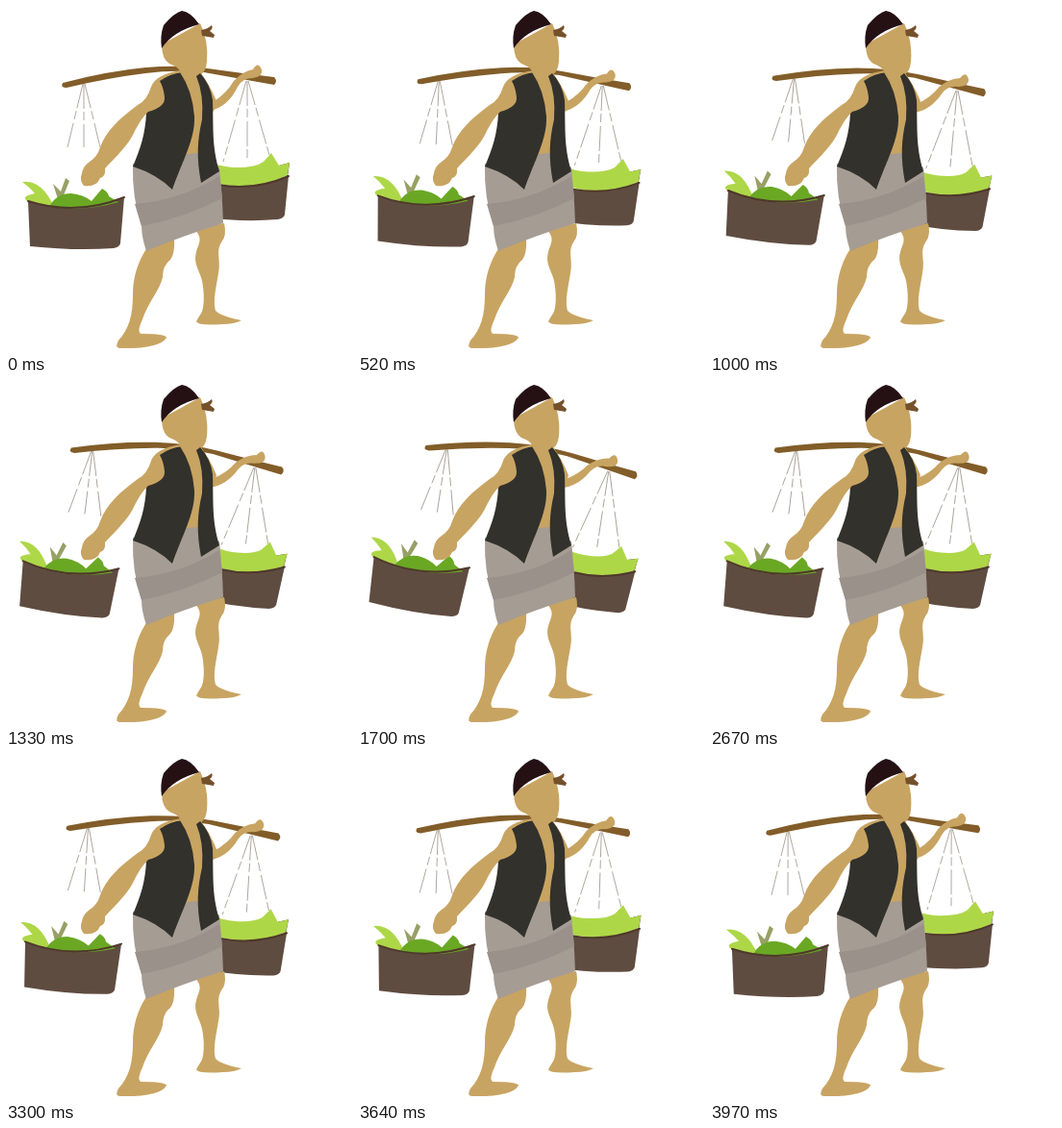
Write an HTML page that moves like this. It is 360 px wide and 360 px high and loops after 4 s.

```html
<!DOCTYPE html>
<html lang="en">
<head>
<meta charset="utf-8">
<title>Vegetable carrier</title>
<style>
  html, body { margin: 0; width: 100%; height: 100%; overflow: hidden; background: #fff; }
  svg { display: block; width: 100vw; height: 100vh; }
  .skin { fill: #c8a462; }
  .vest { fill: #32312c; }
  .wood { fill: #825d29; }
  .basket { fill: #5f4c40; }
  .rim { fill: none; stroke: #4f382b; stroke-width: 2; stroke-linecap: round; }
  .light { fill: #aed748; }
  .green { fill: #6aa824; }
  .string { fill: none; stroke: #8d8474; stroke-width: .7; stroke-dasharray: 26 3 9 4; }
</style>
</head>
<body>
<svg viewBox="0 0 360 360">
  <g id="load">
    <g id="strings" class="string"></g>
    <!-- left basket -->
    <path class="light" d="M17 183Q37 180 50 209L22 203Q15 198 30 195Q25 189 17 183Z"/>
    <path d="M54 201L49 185L57 193L62 179L66 182L57 204Z" fill="#98a065"/>
    <path id="leftBasket" class="basket"/>
    <path class="green" d="M45 209Q52 195 68 195Q80 196 89 203L100 190Q106 193 107 198L117 204Q84 214 45 209Z"/>
    <path id="leftRim" class="rim"/>
    <!-- right basket -->
    <path d="M284 166L295 163L293 178Z" fill="#4b3328"/>
    <path id="rightBasket" class="basket"/>
    <path class="light" d="M212 163Q228 168 240 168Q260 168 268 162L276 153L284 166L295 163L293 176Q255 196 212 182Z"/>
    <path id="rightRim" class="rim"/>
    <!-- pole -->
    <path class="wood" d="M59 80Q104 68 145 64Q180 61 210 65Q245 70 279 74Q283 78 279 82Q245 76 206 69Q175 66 145 70Q105 75 63 85Q56 85 59 80Z"/>
  </g>

  <!-- right arm -->
  <path class="skin" d="M203 70Q212 82 219 99L216 110L203 100Z"/>
  <path id="forearm" class="skin" d="M202 92L218 98Q230 90 237 78Q246 68 257 66Q262 57 266 66Q268 73 257 75Q246 75 241 84Q232 103 216 108L202 102Z"/>

  <!-- legs -->
  <path class="skin" d="M148 250C136 266 132 285 132 300C132 322 128 336 117 348Q113 355 118 356Q160 357 167 345Q166 341 140 341Q136 338 142 326C148 308 160 296 163 282Q163 270 171 264Q176 258 175 241Z"/>
  <path class="skin" d="M196 232C206 243 200 247 198 256C194 270 204 277 205 292Q207 308 204 318L198 328Q199 333 226 331Q238 331 245 327Q224 323 218 317C215 306 219 291 221 278C224 264 218 256 224 246Q230 239 227 226Z"/>

  <!-- head, chest and clothes -->
  <path class="skin" d="M162 40L202 18Q211 36 209 58Q208 68 203 71L212 150L190 170L160 150L160 76L181 68Q179 63 170 60Q162 55 162 40Z"/>
  <path fill="#a59c93" d="M132 164L173 180L188 154L199 153L222 168Q225 195 226 226Q184 239 146 255Q141 240 141 229Q131 200 132 164Z"/>
  <path fill="#9a918a" d="M134 206Q182 202 222 177L225 200Q187 220 141 229Z"/>
  <path class="vest" d="M160 77Q172 70 181 69Q194 88 196 115C197 138 184 160 173 191Q157 175 132 167C140 148 145 133 146 111L158 84Z"/>
  <path class="vest" d="M202 70Q213 82 215 98C216 128 214 145 222 172L203 184C198 157 199 140 204 118Q206 92 198 73Z"/>

  <!-- left arm -->
  <path class="skin" d="M182 67Q156 71 151 84Q147 98 137 103C118 117 104 130 98 147Q95 157 87 162Q80 167 79 174Q76 182 81 187Q94 189 98 179Q104 177 103 169C113 158 124 148 131 136Q140 117 148 110Q166 105 165 95Q164 85 160 78Q171 70 184 69Z"/>

  <!-- hat -->
  <path fill="#74502b" d="M203 25Q210 24 214 20Q216 23 212 26L217 30L216 33L204 31Z"/>
  <path fill="#251014" d="M162 44Q160 31 164 20Q175 7 183 5Q192 6 201 19Q174 26 162 44Z"/>
</svg>
<script>
  const HALF = 2000, LOAD_SWING = 10.2, ARM_SWING = 16.4;
  const byId = id => document.getElementById(id);

  // A basket sits under a sagging rim and narrows towards its base.
  function weave(side, x, y, w, h) {
    const mid = x + w / 2, right = x + w, base = y + h;
    const rim = `M${x} ${y}Q${mid} ${y + 16} ${right} ${y - 4}`;
    byId(side + 'Rim').setAttribute('d', rim);
    byId(side + 'Basket').setAttribute('d', rim +
      `L${right - 4} ${base - 4}Q${right - 5} ${base} ${right - 11} ${base + 1}` +
      `Q${mid} ${base + 4} ${x + 2} ${base - 1}Z`);
  }

  // Three strings fan out from one knot on the pole.
  function hang(x, y, drop, spread) {
    for (const k of [-1, 0, 1]) {
      const line = document.createElementNS('http://www.w3.org/2000/svg', 'path');
      line.setAttribute('d', `M${x + k} ${y}L${x + k * spread} ${y + drop}`);
      byId('strings').append(line);
    }
  }

  weave('left', 23, 203, 100, 48);
  weave('right', 202, 181, 92, 40);
  hang(81, 81, 66, 17);
  hang(251, 78, 84, 25);

  const turn = (id, angle, x, y) =>
    byId(id).setAttribute('transform', `rotate(${angle.toFixed(3)} ${x} ${y})`);

  const start = performance.now();
  function frame() {
    const t = (performance.now() - start) % (2 * HALF);
    const tilt = 1 - Math.abs(1 - t / HALF);
    turn('load', LOAD_SWING * tilt, 144, 151);
    turn('forearm', ARM_SWING * tilt, 196, 92);
    requestAnimationFrame(frame);
  }
  frame();
</script>
</body>
</html>
```
